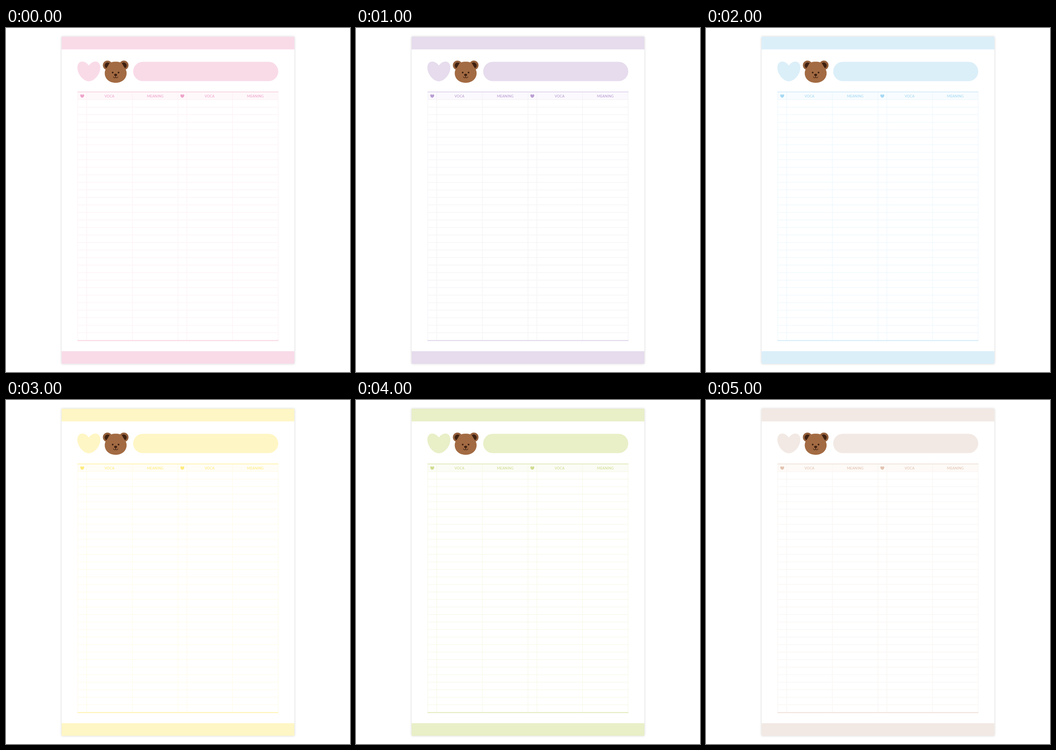
Animation of 748x748 px, one loop 6 s. Source, as an HTML page:

```html
<!DOCTYPE html>
<html lang="en">
<head>
<meta charset="utf-8">
<title>Vocabulary sheet</title>
<style>
  html, body { margin: 0; width: 100%; height: 100%; overflow: hidden; background: #fff; }
  svg { display: block; width: 100vw; height: 100vh; animation: palette 6s step-end infinite; }
  @keyframes palette {
    0%       { --band: #f9dbe8; --rule: #f8d0e0; --ink: #efa3cb; --line: #fdeff4; --head: #fef8fa; }
    16.6667% { --band: #e6dced; --rule: #dccfe9; --ink: #b99dd3; --line: #f2f0f4; --head: #fbf9fd; }
    33.3333% { --band: #dbeff9; --rule: #cfeaf8; --ink: #a5d9f3; --line: #eaf6fc; --head: #f8fcfe; }
    50%      { --band: #fff6c5; --rule: #fff2a6; --ink: #ffec7c; --line: #fffbe6; --head: #fffdf6; }
    66.6667% { --band: #e9efc7; --rule: #e0e8b4; --ink: #d0dc90; --line: #f5f8e4; --head: #fbfcf5; }
    83.3333%, 100% { --band: #f2e9e4; --rule: #eedfd5; --ink: #e2c3b1; --line: #f8f4f1; --head: #fdfaf7; }
  }
  .page { fill: #fff; filter: drop-shadow(0 0 2.5px rgba(0, 0, 0, .18)); }
  .band { fill: var(--band); }
  .head { fill: var(--head); }
  .grid { fill: none; stroke: var(--line); }
  .rule { stroke: var(--rule); stroke-width: 1.7; }
  .ink { fill: var(--ink); }
  text { font: 500 7.5px Lato, sans-serif; letter-spacing: .1px; text-anchor: middle; }
  .fur { fill: #a36b43; }
  .ear { fill: #94603c; }
  .dark { fill: #3d2011; }
  .mouth { fill: none; stroke: #3d2011; stroke-width: 1.2; stroke-linecap: round; }
</style>
</head>
<body>
<svg viewBox="0 0 748 748">
  <defs>
    <path id="heart" d="M0-14C-4-20-10-22.500-14.500-22.500C-21.500-22.500-25-16.500-25-9.500C-25 6-11 20.500 0 20.500C11 20.500 25 6 25-9.500C25-16.500 21.500-22.500 14.500-22.500C10-22.500 4-20 0-14Z"/>
    <g id="labels" class="ink">
      <use href="#heart" transform="translate(165.700 148) scale(.17)"/>
      <text x="225" y="150.700">VOCA</text>
      <text x="324.500" y="150.700">MEANING</text>
    </g>
  </defs>

  <rect class="page" x="121" y="19" width="506" height="711"/>
  <rect class="band" x="121" y="19" width="506" height="27.500"/>
  <rect class="band" x="121" y="702.700" width="506" height="27.300"/>

  <use class="band" href="#heart" x="180.200" y="95.500"/>
  <rect class="band" x="276.500" y="73.500" width="315.500" height="42" rx="21"/>

  <g>
    <circle class="ear" cx="220.700" cy="81" r="10.200"/>
    <circle class="ear" cx="256.300" cy="81" r="10.200"/>
    <circle class="dark" cx="221" cy="81.500" r="6.500"/>
    <circle class="dark" cx="256" cy="81.500" r="6.500"/>
    <path class="fur" d="M238.500 73.200C246 73.200 251.500 74.500 254.500 81C257 86.500 262.300 90 262.300 98C262.300 111 251.500 119.200 238.500 119.200C225.500 119.200 214.700 111 214.700 98C214.700 90 220 86.500 222.500 81C225.500 74.500 231 73.200 238.500 73.200Z"/>
    <circle class="dark" cx="232" cy="96.800" r="1.900"/>
    <circle class="dark" cx="244.700" cy="96.800" r="1.900"/>
    <ellipse class="dark" cx="238.400" cy="101.900" rx="3.200" ry="2.300"/>
    <path class="mouth" d="M238.400 103V106.500M233.400 106C234 109.200 238 109.200 238.400 106.500C238.800 109.200 242.800 109.200 243.400 106"/>
  </g>

  <rect class="head" x="156" y="139" width="436" height="17"/>
  <path class="grid" id="grid"/>
  <path class="rule" d="M155.500 139H592.300M155.500 679.700H592.300"/>
  <use href="#labels"/>
  <use href="#labels" x="217.700"/>
</svg>
<script>
  const rowCount = 32, firstRow = 155.8, pitch = 16.35;
  const columns = [156, 175.5, 274.8, 374, 393.3, 492.6, 591.8];
  const across = Array.from({ length: rowCount }, (_, i) => `M156 ${firstRow + i * pitch}H592`);
  const down = columns.map(x => `M${x} 139V680`);
  document.getElementById('grid').setAttribute('d', [...across, ...down].join(''));
</script>
</body>
</html>
```
